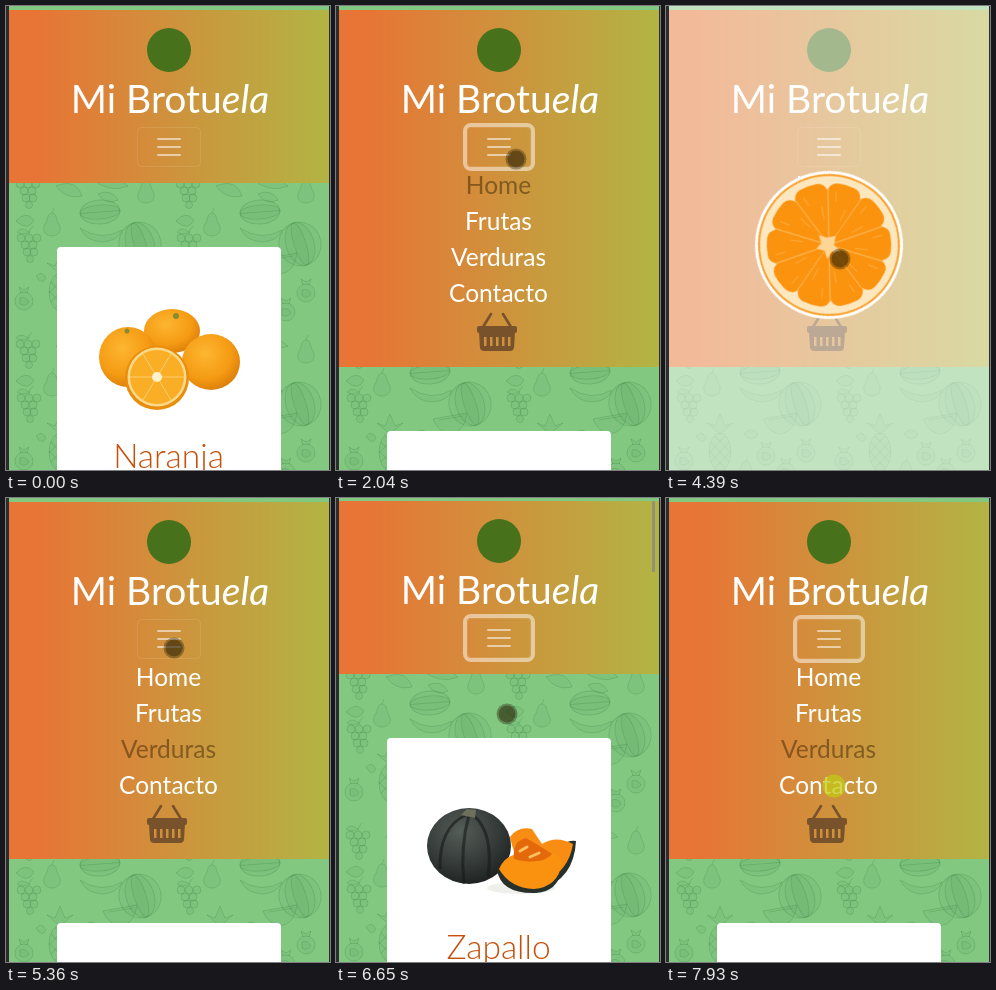
These frames come from a looping animation (324 px wide and 464 px high, 8 s). An HTML page:

```html
<!DOCTYPE html>
<html lang="es">
<head>
<meta charset="utf-8">
<title>Mi Brotuela</title>
<style>
html, body { margin: 0; width: 100%; height: 100%; overflow: hidden; background: #2e2e30; }
#view { position: absolute; left: 3px; top: 0; width: 320px; height: 464px; overflow: hidden; background: #83c881; }
#page, #view svg, #veil { position: absolute; left: 0; top: 0; width: 320px; height: 464px; }
#view svg { overflow: hidden; }
text { font-family: Lato, "Open Sans", sans-serif; text-anchor: middle; }
.name { font-size: 33.5px; font-weight: 300; fill: #c4500a; }

/* every animation shares one 8 s clock: 1% = 80 ms */
.t { animation: 8s ease infinite; }
.s { animation: 8s step-end infinite; }

#page { animation-name: scroll; animation-timing-function: linear; }
#view #header { top: 4px; height: 173px; background: linear-gradient(90deg, #e87435 8%, #b2b444); animation-name: header; }
#view #nav { top: 161px; height: 0; animation-name: nav; }
#card { animation-name: card; }
#body { animation-name: ready; }
#ring { animation-name: ring; }
#fruit { animation-name: first; }
#veg { animation-name: second; }
#home { animation-name: home; }
#frutas { animation-name: frutas; }
#verduras { animation-name: verduras; }
#veil { background: rgba(255,255,255,.5); }
#veil, #loader { animation-name: load; }
#spin { animation-name: spin; animation-timing-function: linear; }
#bar { animation-name: bar; animation-timing-function: linear; }
#cursor { animation-name: move; }
#dark { animation-name: dark; }
#tap { animation-name: tap; }

@keyframes header {
  0%, 19.25% { height: 173px } 22.2%, 71.1% { height: 357px }
  75.5%, 91.75% { height: 173px } 95.75%, 100% { height: 357px }
}
@keyframes nav {
  0%, 19.25% { height: 0 } 22.2%, 71.1% { height: 184px }
  75.5%, 91.75% { height: 0 } 95.75%, 100% { height: 184px }
}
@keyframes card {
  0%, 19.25% { transform: translateY(0) } 22.2%, 71.1% { transform: translateY(184px) }
  75.5%, 91.75% { transform: translateY(0) } 95.75%, 100% { transform: translateY(184px) }
}
@keyframes scroll {
  0%, 82.5% { transform: translateY(0) } 83.1%, 83.7% { transform: translateY(-1px) }
  85.2% { transform: translateY(-36px) } 87.4% { transform: translateY(-1px) }
  88.25%, 100% { transform: translateY(0) }
}
@keyframes load {
  0% { opacity: 0 } 34.25% { opacity: 1 } 42.1% { opacity: 0 }
  53.1% { opacity: 1 } 59.25%, 100% { opacity: 0 }
}
@keyframes ready {
  0% { opacity: 1 } 34.25% { opacity: 0 } 42.1% { opacity: 1 }
  53.1% { opacity: 0 } 59.25%, 100% { opacity: 1 }
}
@keyframes spin {
  0%, 36% { transform: rotate(0) } 42.1% { transform: rotate(180deg) }
  42.2%, 53.1% { transform: rotate(0) } 59.25%, 100% { transform: rotate(180deg) }
}
@keyframes ring { 0% { opacity: 0 } 19.25% { opacity: 1 } 33% { opacity: 0 } 71.1%, 100% { opacity: 1 } }
@keyframes first { 0% { opacity: 1 } 53.1%, 100% { opacity: 0 } }
@keyframes second { 0% { opacity: 0 } 53.1%, 100% { opacity: 1 } }
@keyframes home { 0% { fill: rgba(50,30,0,.48) } 34.25%, 100% { fill: #fff } }
@keyframes frutas { 0% { fill: #fff } 34.25% { fill: rgba(50,30,0,.48) } 53.1%, 100% { fill: #fff } }
@keyframes verduras { 0% { fill: #fff } 53.1%, 100% { fill: rgba(50,30,0,.48) } }
@keyframes bar { 0%, 82.4% { opacity: 0 } 82.6%, 88.25% { opacity: 1 } 91%, 100% { opacity: 0 } }
@keyframes move {
  0%, 4% { transform: translate(299px, 440px) }
  13.375%, 14.25% { transform: translate(187px, 168px) }
  16%, 25.5% { transform: translate(180px, 153px) }
  30.6%, 46.25% { transform: translate(169px, 220px) }
  48.9%, 62.5% { transform: translate(174px, 253px) }
  66.25%, 77.6% { transform: translate(168px, 150px) }
  81.9%, 83.7% { transform: translate(171px, 216px) }
  85.2% { transform: translate(171px, 181px) }
  87.4%, 88.25% { transform: translate(171px, 216px) }
  90.6%, 93.75% { transform: translate(168px, 150px) }
  97.5%, 100% { transform: translate(168px, 288px) }
}
@keyframes dark {
  0% { opacity: 0 } 4% { opacity: 1 }
  18.75% { opacity: 0 } 20.5% { opacity: 1 }
  31.25% { opacity: 0 } 33% { opacity: 1 }
  51.4% { opacity: 0 } 53.1% { opacity: 1 }
  69.5% { opacity: 0 } 71.1% { opacity: 1 }
  90.8% { opacity: 0 } 92% { opacity: 1 }
  98.375%, 100% { opacity: 0 }
}
@keyframes tap {
  0% { opacity: 0 }
  18.75% { opacity: 1 } 20.5% { opacity: 0 }
  31.25% { opacity: 1 } 33% { opacity: 0 }
  51.4% { opacity: 1 } 53.1% { opacity: 0 }
  69.5% { opacity: 1 } 71.1% { opacity: 0 }
  90.8% { opacity: 1 } 92% { opacity: 0 }
  98.375%, 100% { opacity: 1 }
}
</style>
</head>
<body>
<div id="view">
  <div id="page" class="t">
    <svg id="scene" style="height:520px">
      <defs>
        <g id="grapes">
          <circle cx="-8" r="4"/><circle r="4"/><circle cx="8" r="4"/>
          <circle cx="-4" cy="7" r="4"/><circle cx="4" cy="7" r="4"/>
          <circle cx="-2" cy="14" r="4"/><circle cx="5" cy="14" r="4"/><circle cx="1" cy="21" r="3.5"/>
          <path d="M0-4Q0-9 4-12M0-6Q-8-12-12-6Q-6-2 0-6"/>
        </g>
        <g id="pom">
          <circle r="9"/><path d="M-3-8L-5-14L0-11L5-14L3-8M-4-3Q2-5 5 1Q1 6-4 3Z"/>
        </g>
        <g id="pear"><path d="M0-11C5-11 4-4 7 0C11 8 5 12 0 12S-11 8-7 0C-4-4-5-11 0-11ZM0-11L2-16"/></g>
        <radialGradient id="peel" cx=".4" cy=".35" r=".7">
          <stop stop-color="#fdb630"/><stop offset=".65" stop-color="#f59a13"/><stop offset="1" stop-color="#d97c0a"/>
        </radialGradient>
        <radialGradient id="rind" cx=".4" cy=".3" r=".75">
          <stop stop-color="#555d58"/><stop offset=".6" stop-color="#343a38"/><stop offset="1" stop-color="#1c2120"/>
        </radialGradient>
        <pattern id="tile" width="160" height="160" patternUnits="userSpaceOnUse">
          <g fill="#3f8f48" fill-opacity=".08" stroke="#3b8c46" stroke-opacity=".3">
            <use href="#grapes" x="22" y="18"/>
            <use href="#grapes" x="23" y="72"/>
            <g transform="translate(94 46) rotate(-4)">
              <ellipse rx="20" ry="12"/><ellipse rx="20" ry="7"/><path d="M-20 0H20"/>
            </g>
            <path d="M74 62Q95 76 116 64Q112 75 96 76Q80 75 74 62Z"/>
            <g transform="translate(134 78) rotate(-18)">
              <ellipse rx="21" ry="22"/><ellipse rx="14" ry="22"/><ellipse rx="6" ry="22"/>
            </g>
            <path d="M97 93L131 87Q129 106 114 108Q102 106 97 93ZM103 94L127 90"/>
            <g transform="translate(54 126)">
              <ellipse rx="11" ry="19"/><path d="M-9-10L9 10M-11-1L5 16M-5-16L11 1M9-10L-9 10M11-1L-5 16M5-16L-11 1"/>
              <path d="M0-18L-13-29L-5-26L0-38L5-26L13-29Z"/>
            </g>
            <use href="#pom" x="100" y="130"/><use href="#pom" x="140" y="127"/>
            <use href="#pom" x="18" y="135"/><use href="#pom" x="120" y="146"/>
            <use href="#pear" x="46" y="58"/><use href="#pear" x="80" y="146"/>
            <use href="#pear" x="140" y="25"/>
            <path d="M10 55Q20 44 28 54Q22 66 10 55ZM50 20Q70 12 76 30Q60 34 50 20ZM84 12Q108 6 122 20Q104 28 84 12ZM92 28Q105 22 112 34Q100 40 92 28Z"/>
            <path d="M30 110Q36 104 40 112Q36 120 30 110ZM78 108Q86 100 92 108Q86 118 78 108Z"/>
          </g>
        </pattern>
      </defs>
      <g transform="translate(-3 0)">
        <rect width="324" height="520" fill="#83c881"/>
        <rect width="324" height="520" fill="url(#tile)"/>
        <g id="card" class="t"><g id="body" class="s">
          <rect x="51" y="241" width="224" height="400" rx="4" fill="#fff"/>
          <g id="fruit" class="s">
            <ellipse cx="166" cy="325" rx="28" ry="22" fill="url(#peel)"/>
            <circle cx="170" cy="310" r="3" fill="#8a8a30"/>
            <ellipse cx="122" cy="351" rx="29" ry="30" fill="url(#peel)"/>
            <circle cx="121" cy="325" r="2.5" fill="#8a8a30"/>
            <ellipse cx="205" cy="356" rx="29" ry="28" fill="url(#peel)"/>
            <circle cx="151" cy="372" r="32" fill="#e98d0c"/>
            <circle cx="151" cy="371" r="29.5" fill="#fbd98c"/>
            <circle cx="151" cy="371" r="27" fill="#f9ae25"/>
            <path d="M124 371H178M137 348L165 394M165 348L137 394" stroke="#fbcf70"/>
            <circle cx="151" cy="371" r="5" fill="#fff1cc"/>
            <text class="name" x="162.5" y="462">Naranja</text>
          </g>
          <g id="veg" class="s">
            <ellipse cx="185" cy="391" rx="34" ry="6" fill="#efefec"/>
            <ellipse cx="133" cy="349" rx="42" ry="38" fill="url(#rind)"/>
            <path d="M130 318Q103 330 104 372M133 318Q124 350 128 387M137 318Q158 335 152 380" fill="none" stroke="#161a19" stroke-opacity=".6" stroke-width="3"/>
            <path d="M125 318L131 312L140 313L139 321Z" fill="#6f705c"/>
            <path d="M205 392Q238 382 240 344Q226 342 212 362Z" fill="#27302a"/>
            <path d="M174 340Q182 329 196 332L206 347Q220 338 237 347Q233 373 208 386Q180 372 174 340Z" fill="#f98d14"/>
            <path d="M161 372Q164 397 200 396Q222 394 225 374Z" fill="#27302a"/>
            <path d="M163 372Q172 352 198 358Q222 352 226 366Q222 390 198 392Q174 391 163 372Z" fill="#fb920f"/>
            <path d="M178 362Q176 344 190 341Q206 350 216 357Q206 369 178 362Z" fill="#e3690a"/>
            <path d="M184 354L191 350M194 360L203 356" stroke="#ffc060" stroke-width="3" stroke-linecap="round"/>
            <text class="name" x="162.5" y="462">Zapallo</text>
          </g>
        </g></g>
      </g>
    </svg>
    <svg id="header" class="t">
      <g transform="translate(-3 -4)">
        <circle cx="163" cy="44" r="22" fill="#47711b"/>
        <text x="164" y="107" font-size="39" fill="#fff">Mi Brotu<tspan font-style="italic">ela</tspan></text>
        <rect x="131.5" y="121.5" width="63" height="39" rx="4" fill="none" stroke="#fff" stroke-opacity=".1"/>
        <path d="M152 133H174M152 141H174M152 149H174" stroke="#fff" stroke-opacity=".55" stroke-width="2" stroke-linecap="round"/>
        <rect id="ring" class="s" x="129" y="119" width="68" height="44" rx="6" fill="none" stroke="#fff" stroke-opacity=".5" stroke-width="4"/>
      </g>
    </svg>
    <svg id="nav" class="t">
      <g transform="translate(-3 -161)" font-size="24.5" fill="#fff">
        <text id="home" class="s" x="162.5" y="188">Home</text>
        <text id="frutas" class="s" x="162.5" y="224">Frutas</text>
        <text id="verduras" class="s" x="162.5" y="260">Verduras</text>
        <text x="162.5" y="296">Contacto</text>
        <g fill="#78522b">
          <path d="M155 308L147 321M167 308L175 321" stroke="#78522b" stroke-width="2.6" stroke-linecap="round"/>
          <rect x="141" y="320" width="40" height="7" rx="2"/>
          <path fill-rule="evenodd" d="M143 326H179L178 342Q177 345 174 345H148Q145 345 144 342ZM148 331V340H150.500V331ZM154 331V340H156.500V331ZM160 331V340H162.500V331ZM166 331V340H168.500V331ZM172 331V340H174.500V331Z"/>
        </g>
      </g>
    </svg>
  </div>
  <div id="veil" class="s"></div>
  <svg>
    <defs>
      <g id="seg">
        <path d="M0 0L-17-52Q-16-60-9-61.500Q0-63 9-61.500Q16-60 17-52Z" fill="#fb930f"/>
        <path d="M0 0L-17-54" stroke="#fdb550" stroke-width="1.200"/>
        <path d="M4-26L6-38M-6-44L-8-53" stroke="#fcab3c" stroke-linecap="round"/>
      </g>
      <g id="pair"><use href="#seg"/><use href="#seg" transform="rotate(180)"/></g>
    </defs>
    <g transform="translate(-3 0)">
      <g id="loader" class="s"><g transform="translate(163 239)"><g id="spin" class="t">
        <circle r="74" fill="#fff"/>
        <circle r="71" fill="#f9a02c"/>
        <circle r="69" fill="#fde7bf"/>
        <use href="#pair"/><use href="#pair" transform="rotate(36)"/><use href="#pair" transform="rotate(72)"/>
        <use href="#pair" transform="rotate(108)"/><use href="#pair" transform="rotate(144)"/>
        <path d="M-3-11L3-4L13-5L7 2L10 10L2 7L-5 12L-6 5L-14 2L-7-3Z" fill="#fdd595"/>
      </g></g></g>
      <rect id="bar" class="t" x="316" y="3" width="3" height="71" rx="1" fill="#888" fill-opacity=".8"/>
      <g id="cursor" class="t">
        <g id="dark" class="s" fill="#231a00">
          <circle r="10.5" fill-opacity=".35"/><circle r="8.5" fill-opacity=".42"/>
        </g>
        <circle id="tap" class="s" r="11.5" fill="#c3c814" fill-opacity=".75"/>
      </g>
    </g>
  </svg>
</div>
</body>
</html>
```
